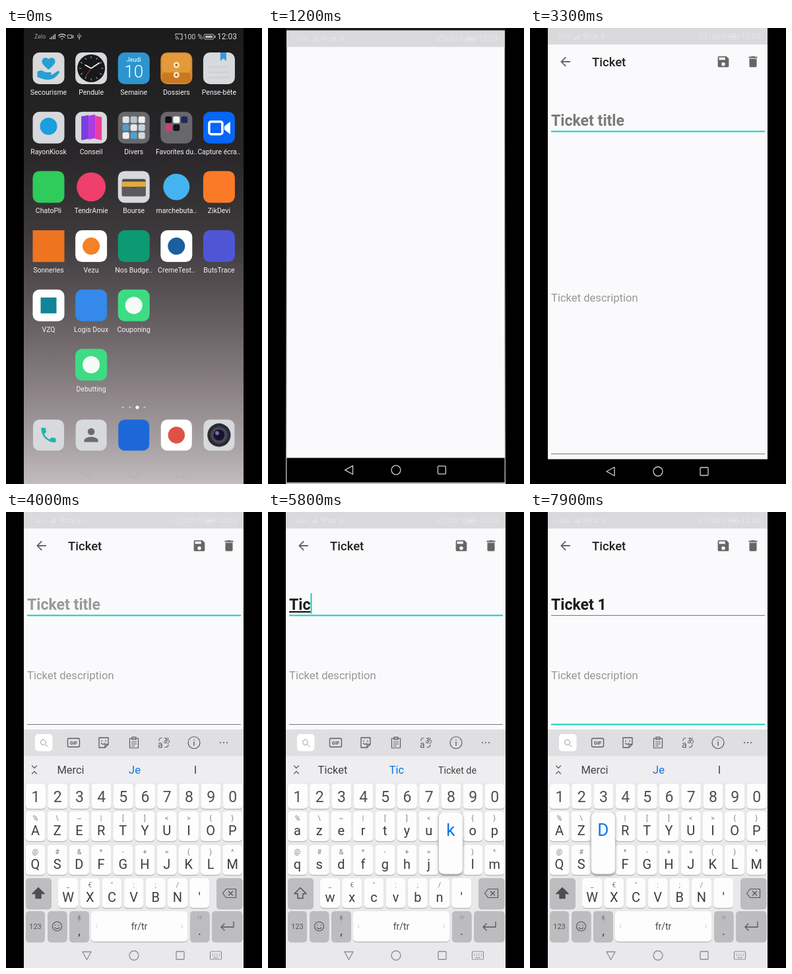
An HTML page for the animation above (8 s loop, 388x690 px).

```html
<!DOCTYPE html>
<html lang="fr">
<head>
<meta charset="utf-8">
<title>Ticket</title>
<style>
  html, body { margin: 0; width: 100%; height: 100%; overflow: hidden; background: #000; }
  svg { display: block; width: 100vw; height: 100vh; }
  text { font-family: Roboto, sans-serif; white-space: pre; }
  .mid { text-anchor: middle; }
  .line { fill: none; stroke-linecap: round; stroke-linejoin: round; }
</style>
</head>
<body>
<svg id="stage" viewBox="0 0 388 690"></svg>
<script>
const LOOP = 8000, TEAL = '#14cdbb', BLUE = '#0f73e6', INK = '#5c5c5e';

// Drawing helpers
const rect = (x, y, w, h, r, fill, more = '') =>
  `<rect x="${x}" y="${y}" width="${w}" height="${h}" rx="${r}" fill="${fill}" ${more}/>`;
const disc = (x, y, r, fill, more = '') => `<circle cx="${x}" cy="${y}" r="${r}" fill="${fill}" ${more}/>`;
const path = (d, fill, more = '') => `<path d="${d}" fill="${fill}" ${more}/>`;
const line = (d, color, w = 1.2, more = '') =>
  `<path class="line" d="${d}" stroke="${color}" stroke-width="${w}" ${more}/>`;
const text = (x, y, size, fill, str, more = '') =>
  `<text x="${x}" y="${y}" font-size="${size}" fill="${fill}" ${more}>${str.replace('&', '&amp;').replace('<', '&lt;')}</text>`;
const mid = (x, y, size, fill, str, more = '') => text(x, y, size, fill, str, 'class="mid" ' + more);
const at = (x, y, body, scale = 1) => `<g transform="translate(${x} ${y}) scale(${scale})">${body}</g>`;
const group = (id, body) => `<g id="${id}">${body}</g>`;

const glyphs = {
  back: 'M20 11H7.8l5.600-5.600L12 4l-8 8 8 8 1.400-1.400L7.8 13H20z',
  save: 'M17 3H5a2 2 0 0 0-2 2v14a2 2 0 0 0 2 2h14a2 2 0 0 0 2-2V7zm-5 16a3 3 0 1 1 0-6 3 3 0 0 1 0 6zm3-10H5V5h10z',
  bin: 'M6 19a2 2 0 0 0 2 2h8a2 2 0 0 0 2-2V7H6zM19 4h-3.5l-1-1h-5l-1 1H5v2h14z',
  phone: 'M6.6 10.8c1.4 2.8 3.8 5.1 6.6 6.6l2.2-2.2c.3-.3.7-.4 1-.2 1.1.4 2.3.6 3.6.6.6 0 1 .4 1 1V20c0 .6-.4 1-1 1C10.6 21 3 13.4 3 4c0-.6.4-1 1-1h3.5c.6 0 1 .4 1 1 0 1.2.2 2.5.6 3.6.1.3 0 .7-.3 1z',
  person: 'M12 12a4 4 0 1 0 0-8 4 4 0 0 0 0 8zm0 2c-2.7 0-8 1.3-8 4v2h16v-2c0-2.7-5.3-4-8-4z',
  heart: 'M12 21C5 15 2 12.3 2 8.5 2 5.4 4.4 3 7.5 3c1.7 0 3.4.8 4.5 2.1C13.1 3.8 14.8 3 16.5 3 19.6 3 22 5.4 22 8.5 22 12.3 19 15 12 21z'
};
const glyph = (name, x, y, fill, k = 0.925) => at(x, y, path(glyphs[name], fill, 'transform="translate(-12 -12)"'), k);

// Home screen
const tile = fill => rect(-24, -24, 48, 48, 10, fill);
const pale = tile('#d7d9dc');
const grid = colors => colors.map((c, i) => rect(-17 + i % 3 * 12, -17 + (i / 3 | 0) * 12, 10, 10, 2.5, c)).join('');

const icons = {
  care: pale + glyph('heart', 0, -7, '#269fd3', 1) +
    path('M-17 5q6-4 12 1h8q3 2 0 4h-8 10l9-6q4 0 2 3-6 9-14 10-9 1-19-4z', '#269fd3'),
  clock: pale + disc(0, 0, 21, '#17181a') +
    Array.from({ length: 12 }, (_, i) => line('M0-18v2.500', '#aaa', 1, `transform="rotate(${i * 30})"`)).join('') +
    line('M0 0L-9-5M0 0L12-8', '#fff', 1.6) + line('M0 0L-9 13', '#e34a3e', 0.8),
  day: tile('#2d95ce') + mid(0, -10, 9, '#fff', 'Jeudi') + mid(0, 14, 26, '#fff', '10', 'font-weight="300"'),
  drawer: tile('#d98a2b') + rect(-22, -22, 44, 28, 6, '#e59a3a') + rect(-22, 7, 44, 15, 5, '#c97920') +
    disc(0, -5, 4.5, '#fbe9c8') + disc(0, 10, 4.5, '#fbe9c8') + disc(0, -5, 2, '#b86d1c') + disc(0, 10, 2, '#b86d1c'),
  notes: pale + path('M2-24h9v13l-4.500-4-4.500 4z', '#3599dc') + line('M-15-2h30M-15 6h30M-15 14h30', '#c3c6ca', 1),
  store: pale + disc(0, -2, 13, '#1a9fe0'),
  tips: pale + path('M-15-17L-4-19V17L-15 19z', '#7a3fe0') + path('M-4-18L6-20V16L-4 18z', '#b13be0') + path('M6-18L16-16V19L6 17z', '#ea3fa0'),
  misc: tile('#68686c') + grid(['#dfe5e8', '#b9c5cc', '#f0f0f0', '#4c9fd0', '#e8e8e8', '#c2d5df', '#eee', '#4ba2d5', '#d8d8d8']),
  best: tile('#68686c') + grid(['#111', '#f2f2f2', '#1d2c60', '#d23b7c', '#1a1214']),
  record: tile('#0766f5') + rect(-15, -9, 20, 19, 3, 'none', 'stroke="#fff" stroke-width="3.5"') + path('M8-2l9-7V10L8 3z', '#fff'),
  purse: pale + rect(-18, -12, 36, 26, 3, '#4a4a4c') + rect(-18, -8, 36, 8, 0, '#e2ac3c') + path('M-18 0h13q5 6 10 0h13v14h-36z', '#5b5b5d'),
  call: pale + glyph('phone', 0, 0, '#22b4ac', 1.25),
  contact: pale + glyph('person', 0, 0, '#6b6c70', 1.35),
  camera: pale + disc(0, 0, 18, '#2a2a30') + disc(0, 0, 13, '#47455a') + disc(0, 0, 8.5, '#17142a') + disc(-3, -3, 3, '#8066b5')
};
const spot = (bg, c) => tile(bg) + disc(0, 0, 13, c);

const rows = [
  [['Secourisme', icons.care], ['Pendule', icons.clock], ['Semaine', icons.day], ['Dossiers', icons.drawer], ['Pense-bête', icons.notes]],
  [['RayonKiosk', icons.store], ['Conseil', icons.tips], ['Divers', icons.misc], ['Favorites du..', icons.best], ['Capture écra..', icons.record]],
  [['ChatoPli', tile('#2fcb5b')], ['TendrAmie', disc(0, 0, 22, '#ef3f6b')], ['Bourse', icons.purse], ['marchebuta..', disc(0, 0, 20, '#43b4f0')], ['ZikDevi', tile('#fb7a28')]],
  [['Sonneries', rect(-24, -24, 48, 48, 0, '#ee7420')], ['Vezu', spot('#fff', '#f58025')], ['Nos Budge..', tile('#0c9a72')], ['CremeTest..', spot('#fff', '#1c5f9e')], ['ButsTrace', tile('#4f56d6')]],
  [['VZQ', tile('#fff') + rect(-12, -12, 24, 24, 0, '#12849a')], ['Logis Doux', tile('#3489ea')], ['Couponing', spot('#3ddc84', '#f4fbf6')]],
  [null, ['Debutting', spot('#3ddc84', '#f4fbf6')]]
];
const colX = c => 64.5 + c * 64.6, rowY = r => 61 + r * 89.7;

const statusBar =
  text(43, 16, 9, '#a5a5a5', 'Zelo') +
  path('M66 17h1.500v-2h-1.500zM68.500 17h1.500v-4h-1.500zM71 17h1.500v-6h-1.500zM73.500 17h1.500v-8h-1.500z', '#bbb') +
  line('M79.500 11.500q5.500-4.500 11 0M81.500 14q3.500-3 7 0M84.500 16.500h1', '#c4c4c4', 1.3) +
  line('M94 10.500h5.500v5h-5.500zM99.500 13l2.500-2v4z', '#bbb', 1) +
  line('M111 8.500v9M108.500 11v2l2.500 2 2.500-2v-2', '#bbb', 1) +
  line('M257 11v-2h10v8h-3M257 13q4 0 4 4M257 15.500q1.500 0 1.500 1.500', '#ccc', 1.1) +
  text(269, 17, 11, '#d0d0d0', '100 %') +
  rect(300, 9.5, 15, 7.5, 2, 'none', 'stroke="#bbb"') + rect(302, 11.5, 11, 3.5, 1, '#bbb') + rect(316, 11.5, 1.5, 3.5, 0, '#bbb') +
  text(320, 17, 12, '#d8d8d8', '12:03');

const navShapes = (y, color, w, id = '') =>
  line('M-6.500 0L5.500-6.500V6.500z', color, w, `${id} transform="translate(122.5 ${y})"`) +
  disc(194, y, 7, 'none', `stroke="${color}" stroke-width="${w}"`) +
  rect(258, y - 6, 12, 12, 1, 'none', `stroke="${color}" stroke-width="${w}"`);

const home =
  rect(27, 0, 333, 690, 0, 'url(#sky)') + statusBar +
  rows.map((row, r) => row.map((app, c) => app
    ? at(colX(c), rowY(r), app[1]) + mid(colX(c), rowY(r) + 40, 10.5, '#f4f4f4', app[0]) : '').join('')).join('') +
  [177, 188, 199, 210].map(x => disc(x, 574, x === 199 ? 2.6 : 1.6, x === 199 ? '#fff' : '#c5c0c2')).join('') +
  [icons.call, icons.contact, tile('#1d68d8'), spot('#fff', '#de5246'), icons.camera].map((icon, c) => at(colX(c), 616, icon, 0.98)).join('') +
  navShapes(673, '#b3adaf', 1);

// Application screens
const fab = disc(319, 613, 26, '#000', 'opacity=".28" filter="url(#soft)"') + disc(319, 611, 26, '#03dac5') +
  disc(319, 611, 26, '#fff', 'id="ripple" opacity="0"') + line('M312.500 611h13M319 604.500v13', '#111', 1.9);
const list = text(42, 58, 18.5, '#222', 'Tickets', 'font-weight="500"') + fab;

const edit =
  rect(27, 25, 333, 628, 0, '#faf9fb') +
  glyph('back', 53.5, 51, '#666') + text(94, 58, 18.5, '#222', 'Ticket', 'font-weight="500"') +
  glyph('save', 293, 51, '#666') + glyph('bin', 338, 51, '#666') +
  text(32, 148, 23.1, '#999', 'Ticket title', 'id="title" font-weight="700"') +
  rect(32, 155.5, 324, 2, 0, TEAL, 'id="title-line"') +
  text(32, 414, 16.6, '#979797', 'Ticket description', 'id="note"') +
  rect(32, 644, 324, 1, 0, '#777', 'id="note-line"') +
  rect(32, 123, 2, 31, 0, TEAL, 'id="caret"');

// Keyboard
const PITCH = 33.2, KEY = '#fdfdfd', MOD = '#bdbdbf';
const layout = [
  { y: 411, x: 45, keys: '1234567890', h: 38 },
  { y: 453, x: 44.5, keys: 'azertyuiop', subs: '%\\~|[]<>{}' },
  { y: 504, x: 44.5, keys: 'qsdfghjklm', subs: '@#&*-+=()^' },
  { y: 554, x: 94, keys: "wxcvbn'", subs: '_€":;/ ' }
];
const cap = (x, y, w, fill, h = 46) => rect(x, y + 1.2, w, h, 5, '#b7b5b7') + rect(x, y, w, h, 5, fill);
const keyX = (row, i) => row.x + i * PITCH;

const letters = layout.map(row => [...row.keys].map((k, i) => {
  const x = keyX(row, i);
  return cap(x - 15, row.y, 30, KEY, row.h || 45) + (row.subs
    ? mid(x, row.y + 14, 10.5, '#7c7c7e', row.subs[i]) + mid(x, row.y + 36, 20, '#3d3d3f', k, `data-key="${k}"`)
    : mid(x, row.y + 28, 23, '#505052', k));
}).join('')).join('');

const toolbar =
  rect(44, 336, 26.5, 26, 5, '#fff') + line('M60 352l3 3M60.500 348.500a4 4 0 1 0-8 0 4 4 0 1 0 8 0', '#999', 1) +
  rect(93.5, 342.5, 18, 13, 2, 'none', `stroke="${INK}" stroke-width="1.3"`) + mid(102.5, 352, 7.5, INK, 'GIF', 'font-weight="700"') +
  line('M141 341.500h14v10l-5 5h-9zM155 351.500h-5v5M145 346v1M151 346v1M144.500 350q3 3 5 0', INK, 1.3) +
  line('M187.500 342.500h13v14.500h-13zM191 340.500h6v4h-6zM190.500 348h7M190.500 351h7M190.500 354h4', INK, 1.2) +
  text(230, 357, 14, INK, 'a') + text(238, 350, 11, INK, 'あ', 'style="font-family:\'Noto Sans CJK JP\',sans-serif"') +
  line('M232 346q0-4 4-4M246 352q0 4-5 4', INK, 1.1) +
  disc(285, 349, 9, 'none', `stroke="${INK}" stroke-width="1.2"`) + line('M285 348v5M285 344.500v.2', INK, 1.4) +
  [325, 330, 335].map(x => disc(x, 349, 1.1, INK)).join('');

const keyboard =
  rect(27, 329, 333, 361, 0, '#e9e8ea') + rect(27, 329, 333, 40.5, 0, '#dfdee0') + toolbar +
  rect(27, 369.5, 333, 40, 0, '#eeedef') +
  line('M39.500 384l3.500 3.500 3.500-3.500M39.500 396l3.500-3.500 3.500 3.500', INK, 1.2) +
  [98, 195, 287].map((x, i) => mid(x, 396, 16.5, i === 1 ? BLUE : '#444', '', `id="hint${i}"`)).join('') +
  letters +
  cap(30, 554, 39, MOD) + line('M49 568.500l-9 9h5v7h8v-7h5z', '#4f4f51', 1.4, 'id="shift"') +
  cap(319, 554, 39.5, MOD) + line('M328.500 577l5-6.500h15v13h-15zM337.500 574l6 6M343.500 574l-6 6', '#555', 1.2) +
  cap(30, 604, 29, MOD) + mid(44.5, 631, 11, '#555', '123') +
  cap(63, 604, 29.5, MOD) + disc(77.5, 627, 7, 'none', 'stroke="#555" stroke-width="1.2"') +
  line('M75 625v.5M80 625v.5M74.500 629q3 3.500 6 0', '#555', 1.2) +
  cap(96, 604, 30, MOD) + rect(109.5, 610, 3, 6, 1.5, '#8b8b8d') + line('M108 615q3 4 6 0M111 617v2', '#8b8b8d', 0.8) + mid(111, 640, 19, '#444', ',') +
  cap(129, 604, 146, KEY) + mid(202, 632, 14, '#444', 'fr/tr') + line('M138 625l-2 2 2 2M266 625l2 2-2 2', '#c8c8ca', 1) +
  cap(279, 604, 29.5, MOD) + mid(293.5, 618, 9, '#8b8b8d', '!?') + mid(293.5, 640, 19, '#444', '.') +
  cap(312, 604, 46.5, MOD) + line('M345 620v8h-19M331 623l-5 5 5 5', '#555', 1.3) +
  group('popup', rect(-18.5, 1.5, 37, 93, 7, '#000', 'opacity=".35" filter="url(#soft)"') + rect(-18, 0, 36, 92.5, 7, '#fdfdfe') +
    mid(0, 35, 26, BLUE, '', 'id="popup-key"'));

const nav = rect(27, 652.5, 333, 37.5, 0, '#000', 'id="nav-bg"') +
  group('nav', navShapes(671, 'currentColor', 1.3, 'id="nav-back"')) +
  group('nav-kb', rect(309.5, 665, 17, 12, 1.5, 'none', 'stroke="#8d8c8e" stroke-width="1.2"') +
    line('M313 669h10.500M313 671.500h10.500', '#8d8c8e', 1.3, 'stroke-dasharray=".2 3.2"') + line('M314.500 674.500h7', '#8d8c8e'));

const shades = [[0, '#1b1b1c'], [.28, '#292729'], [.48, '#413d40'], [.64, '#655e61'], [.8, '#8c8487'], [.92, '#aaa3a5'], [1, '#c2bcbe']];
document.getElementById('stage').innerHTML = `<defs>
  <linearGradient id="sky" x2="0" y2="1">${shades.map(([o, c]) => `<stop offset="${o}" stop-color="${c}"/>`).join('')}</linearGradient>
  <filter id="soft" x="-30%" y="-30%" width="160%" height="160%"><feGaussianBlur stdDeviation="2"/></filter>
  <clipPath id="screen"><rect x="27" width="333" height="690"/></clipPath>
</defs>` + rect(0, 0, 388, 690, 0, '#000') + '<g clip-path="url(#screen)">' + group('home', home) +
  group('app', rect(27, 0, 333, 690, 0, '#faf9fb') + rect(27, 0, 333, 25, 0, '#dadadc') +
    `<g opacity=".3" style="filter:brightness(2)">${statusBar}</g>` +
    group('list', list) + group('edit', edit) + group('keys', keyboard) + nav) + '</g>';

// Timeline
const OPEN = 1000, FOCUS = 3200, KEYS = 3450, NOTE = 7400;
const opening = ['Merci', 'Je', 'I'];
// key, press, release, text after release, suggestions
const strokes = [
  ['T', 4400, 4650, 'T', ['Tu', 'T', 'Ticket']],
  ['i', 4980, 5180, 'Ti', ['Ticket', 'Ti', 'Tient']],
  ['c', 5350, 5580, 'Tic', ['Ticket', 'Tic', 'Ticket de']],
  ['k', 5720, 5920, 'Tick', ['Ticket', 'Tick', 'Ticket de']],
  ['e', 6020, 6180, 'Ticke', ['Ticket', 'Ticke', 'Ticket de']],
  ['t', 6400, 6560, 'Ticket', ['Tickets', 'Ticket', 'Ticket de']],
  [' ', 6650, 6760, 'Ticket ', ['de', 'pour', 'et']],
  ['1', 6960, 7130, 'Ticket 1', ['er', '1', 'ère']],
  ['D', 7820, 8000, '', opening]
];

const $ = id => document.getElementById(id);
const caps = document.querySelectorAll('[data-key]');
const set = (id, attrs) => { for (const k in attrs) $(id).setAttribute(k, attrs[k]); };
const show = (id, on) => $(id).style.display = on ? '' : 'none';
const ramp = (t, from, to) => Math.min(1, Math.max(0, (t - from) / (to - from)));
const easeOut = u => 1 - (1 - u) ** 3;
const mix = (a, b, p) => a + (b - a) * p;

function popup(key) {
  const visible = key && key !== ' ';
  show('popup', visible);
  if (!visible) return;
  const low = key.toLowerCase(), row = layout.find(r => r.keys.includes(low));
  set('popup', { transform: `translate(${keyX(row, row.keys.indexOf(low))} ${row.y - 49})` });
  $('popup-key').textContent = key;
}

function typing(t) {
  const done = strokes.filter(s => t >= s[2]).pop();
  const held = strokes.find(s => t >= s[1] && t < s[2]);
  const inNote = t >= NOTE, typed = done ? done[3] : '', upper = !done || inNote;
  const hints = done && !inNote ? done[4] : opening;

  popup(held && held[0]);
  hints.forEach((h, i) => {
    $('hint' + i).textContent = h;
    set('hint' + i, { 'font-size': h.length > 8 ? 14.3 : 16.5 });
  });
  caps.forEach(c => c.textContent = upper ? c.dataset.key.toUpperCase() : c.dataset.key);
  $('shift').style.fill = upper ? '#4f4f51' : 'none';

  $('title').textContent = typed || 'Ticket title';
  set('title', {
    fill: typed ? '#1c1c1c' : t < KEYS ? '#7a7a7a' : '#999',
    'text-decoration': typed && !inNote && !typed.includes(' ') ? 'underline' : 'none'
  });

  const since = inNote ? NOTE : done ? done[2] : KEYS + 50;
  show('caret', t >= since && (t - since) % 1000 < 500);
  set('caret', inNote ? { x: 32, y: 236, height: 22 }
    : { x: typed ? 32 + $('title').getComputedTextLength() : 31.5, y: 123, height: 31 });
}

function rule(id, y, active) {
  set(id, active ? { y: y - 0.5, height: 2, fill: TEAL } : { y, height: 1, fill: '#777' });
}

function render(t) {
  // The window grows out of its icon
  const p = easeOut(ramp(t, OPEN, OPEN + 255));
  const x = mix(170, 27, p), y = mix(396, 0, p);
  show('app', t > OPEN + 10);
  set('app', {
    transform: `translate(${x} ${y}) scale(${(mix(218, 360, p) - x) / 333} ${(mix(444, 690, p) - y) / 690}) translate(-27 0)`,
    opacity: ramp(t, OPEN, OPEN + 80)
  });

  set('list', { opacity: ramp(t, 1650, 1880) });
  set('ripple', { opacity: 0.4 * ramp(t, 2250, 2350), r: 26 * ramp(t, 2250, 2400) });
  const e = ramp(t, 2380, 2600);
  show('edit', e > 0);
  set('edit', { opacity: e });

  const up = t >= KEYS;
  rule('title-line', 156, t >= FOCUS && t < NOTE);
  rule('note-line', up ? 321 : 644, t >= NOTE);
  set('note', { y: up ? 253 : 414 });
  show('keys', up);
  set('keys', { transform: `translate(0 ${361 * (1 - easeOut(ramp(t, KEYS, KEYS + 250)))})` });
  set('nav-bg', { fill: up ? '#e9e8ea' : '#000' });
  $('nav').style.color = up ? '#8d8c8e' : '#d0d0d0';
  set('nav-back', { transform: `translate(122.5 671) rotate(${up ? -90 : 0})` });
  show('nav-kb', up);
  typing(t);
}

const begin = performance.now();
(function frame() {
  render((performance.now() - begin) % LOOP);
  requestAnimationFrame(frame);
})();
</script>
</body>
</html>
```
